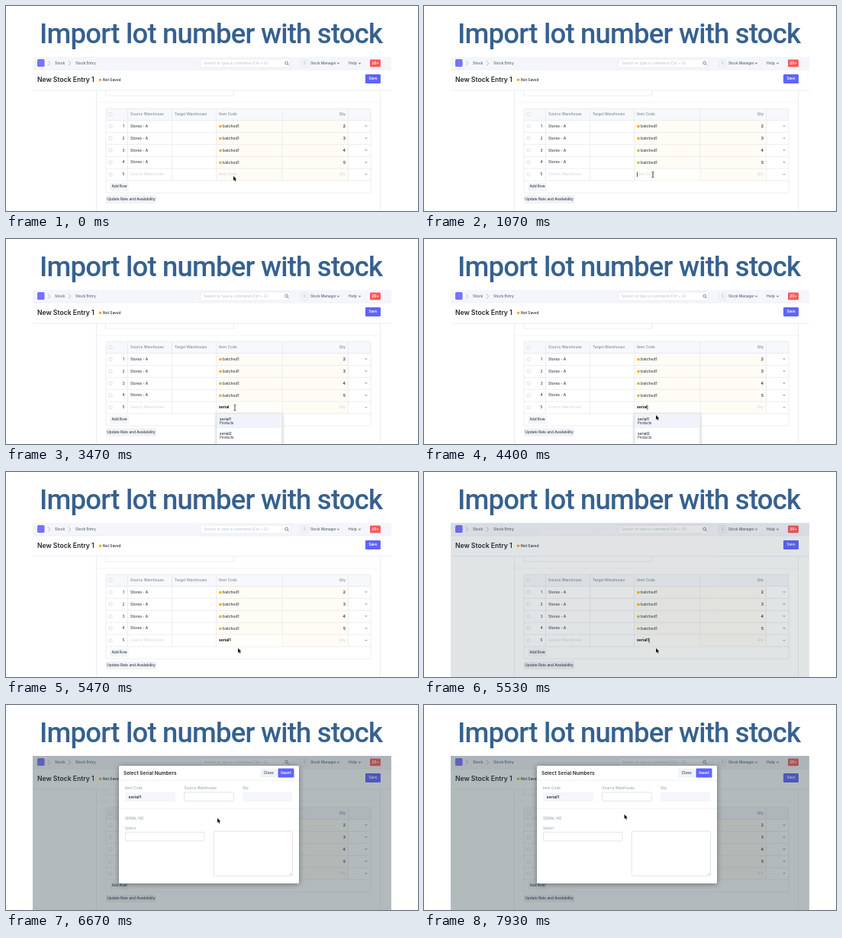
Animation, 540 px wide and 270 px high, one loop 8 s. Source, as an HTML page with a canvas:

```html
<!DOCTYPE html>
<html lang="en">
<head>
<meta charset="utf-8">
<title>Import lot number with stock</title>
<style>
html, body { margin: 0; width: 100%; height: 100%; overflow: hidden; background: #fff; }
canvas { display: block; width: 540px; height: 270px; }
</style>
</head>
<body>
<canvas id="stage"></canvas>
<script>
const LOOP = 8000;
const INK = '#36414c', MUTED = '#8d99a6', FAINT = '#d3d8dd', LINE = '#e2e6eb';
const PANEL = '#f5f6fb', BLUE = '#5e64ff', ORANGE = '#fba61c', OLIVE = '#bdbb55';

const canvas = document.getElementById('stage');
const ctx = canvas.getContext('2d');
const ratio = window.devicePixelRatio || 1;
canvas.width = 540 * ratio;
canvas.height = 270 * ratio;

// Typing: the field grows by one letter at each time, then the suggestion is picked.
const FOCUS = 930, PICK = 4500, OPEN = 5500;
const keyTimes = [1500, 1930, 2670, 2740, 2800, 2930];

// Pointer path: time, x, y
const path = [
  [0, 298, 224], [70, 298, 224], [270, 300, 222], [3470, 300, 222],
  [3950, 304, 232], [6070, 304, 232], [6600, 277, 149], [7900, 277, 149], [7930, 262.5, 144]
];

const clamp = v => Math.max(0, Math.min(1, v));

function rect(x, y, w, h, fill, stroke, radius = 0) {
  ctx.beginPath();
  ctx.roundRect(x, y, w, h, radius);
  if (fill) { ctx.fillStyle = fill; ctx.fill(); }
  if (stroke) { ctx.strokeStyle = stroke; ctx.lineWidth = 0.7; ctx.stroke(); }
}

function line(points, color = LINE, width = 0.7) {
  ctx.beginPath();
  points.forEach(([x, y]) => ctx.lineTo(x, y));
  ctx.strokeStyle = color;
  ctx.lineWidth = width;
  ctx.stroke();
}

function text(str, x, y, { size = 4.85, weight = 500, color = INK, align = 'left' } = {}) {
  ctx.font = `${weight} ${size}px Inter, sans-serif`;
  ctx.fillStyle = color;
  ctx.textAlign = align;
  ctx.textBaseline = 'middle';
  ctx.fillText(str, x, y);
}

function dot(x, y, color) {
  ctx.beginPath();
  ctx.arc(x, y, 1.8, 0, 7);
  ctx.fillStyle = color;
  ctx.fill();
}

function triangle(x, y, color) {
  ctx.beginPath();
  ctx.moveTo(x - 2, y - 1);
  ctx.lineTo(x + 2, y - 1);
  ctx.lineTo(x, y + 1.2);
  ctx.fillStyle = color;
  ctx.fill();
}

function button(label, x, y, w, h, fill, color, weight = 500) {
  rect(x, y, w, h, fill, null, 1.2);
  text(label, x + w / 2, y + h / 2, { color, weight, size: 4.75, align: 'center' });
}

function withShadow(blur, alpha, draw) {
  ctx.save();
  ctx.shadowColor = `rgba(0,0,0,${alpha})`;
  ctx.shadowBlur = blur * ratio;
  ctx.shadowOffsetY = ratio;
  draw();
  ctx.restore();
}

function drawTitle() {
  ctx.font = '500 36.5px Roboto, sans-serif';
  ctx.letterSpacing = '-0.8px';
  ctx.fillStyle = '#36618f';
  ctx.textAlign = 'center';
  ctx.textBaseline = 'alphabetic';
  ctx.fillText('Import lot number with stock', 268.7, 49);
  ctx.letterSpacing = '0px';
}

function drawHeader() {
  rect(35, 67, 470, 17, PANEL);
  line([[35, 84], [505, 84]], '#e8ebf1');
  rect(41, 70, 9.5, 10, '#7573fa', null, 1.5);
  for (const x of [55, 82]) line([[x, 72.3], [x + 2.6, 75.5], [x, 78.7]], '#a4afba', 0.8);
  text('Stock', 64, 75.7, { color: '#59636e' });
  text('Stock Entry', 91, 75.7, { color: '#59636e' });
  rect(255, 70, 118, 11, '#fff', LINE, 1.2);
  text('Search or type a command (Ctrl + G)', 259, 75.8, { color: '#b4bec8', weight: 400 });
  ctx.beginPath();
  ctx.arc(367.7, 75, 1.9, 0, 7);
  ctx.strokeStyle = '#68727c';
  ctx.lineWidth = 0.8;
  ctx.stroke();
  line([[369, 76.4], [371, 78.4]], '#68727c', 0.9);
  rect(386.5, 70.5, 9.5, 10, '#f1f3f7', '#e3e7ec', 1);
  text('S', 391.2, 75.7, { color: '#b4bcc5', align: 'center' });
  text('Stock Manager', 399, 75.7, { size: 4.7, color: '#59636e' });
  triangle(435.5, 75.8, '#8b949d');
  text('Help', 449, 75.7, { color: '#59636e' });
  triangle(463.5, 75.8, '#8b949d');
  button('20+', 477, 70.5, 14, 9.8, '#ff5858', '#fff', 700);

  text('New Stock Entry 1', 41, 97.3, { size: 8.6, weight: 600, color: '#20262c' });
  dot(123.5, 97.3, ORANGE);
  text('Not Saved', 127, 97.3, { size: 4.75, weight: 600 });
  button('Save', 471, 90, 20, 12, BLUE, '#fff', 600);
  line([[35, 111], [505, 111]]);
}

function fieldValue(t) {
  return t >= PICK ? 'serial1' : 'serial'.slice(0, keyTimes.filter(k => k <= t).length);
}

function drawTable(t) {
  line([[118.5, 111], [118.5, 270]]);
  line([[490.5, 111], [490.5, 270]]);
  line([[130.5, 111], [130.5, 118], [298.5, 118], [298.5, 111]]);
  line([[118.5, 127], [490.5, 127]], '#eceff2');

  rect(131, 135, 347, 15.5, '#f7f8fb');
  rect(275.5, 150.5, 173, 79.5, '#fffcf5');
  rect(131, 135, 347, 111, null, LINE, 1);
  for (let i = 0; i < 6; i++) line([[131, 150.5 + i * 15.9], [478, 150.5 + i * 15.9]]);
  for (const x of [159.5, 217.5, 275.5, 362, 448.5]) line([[x, 135], [x, 230]]);

  rect(135, 140.8, 4, 4, '#fff', '#cfd6dc', 0.6);
  const head = { color: '#7f8b97' };
  text('Source Warehouse', 163, 142.6, head);
  text('Target Warehouse', 221, 142.6, head);
  text('Item Code', 279, 142.6, head);
  text('Qty', 445, 142.6, { ...head, align: 'right' });

  for (let i = 0; i < 5; i++) {
    const y = 158.3 + i * 15.9;
    rect(135, y - 2, 4, 4, '#fff', '#cfd6dc', 0.6);
    text(i + 1, 154, y, { align: 'center' });
    triangle(472, y, '#b0b8c0');
    if (i === 4) break;
    text('Stores - A', 163, y);
    dot(281, y + 0.3, i < 2 ? ORANGE : OLIVE);
    text('batched1', 284, y, { size: 5 });
    text(i + 2, 445, y, { size: 5, weight: 700, align: 'right' });
  }

  const y = 221.9;
  text('Source Warehouse', 163, y, { color: FAINT });
  text('Qty', 445, y, { color: FAINT, align: 'right' });
  button('Add Row', 136, 232.5, 25, 11, '#f3f5f8', INK);
  button('Update Rate and Availability', 131, 249.5, 66, 10.5, '#f0f2f6', INK);

  const value = fieldValue(t);
  if (t >= FOCUS) rect(275.9, 214.5, 85.7, 15.2, '#fffefa');
  if (value) text(value, 279, y, { size: 5, weight: 700, color: '#111' });
  else text('Item Code', 279, y, { color: FAINT });

  const lastInput = [FOCUS, ...keyTimes, PICK].filter(k => k <= t).pop();
  if ((t - lastInput) % 1000 < 500) {
    const x = 279.5 + (value ? ctx.measureText(value).width : 0);
    line([[x, y - 3.2], [x, y + 3.2]], '#111', 0.7);
  }
}

function drawSuggestions() {
  withShadow(4, 0.2, () => rect(275.5, 230, 86.5, 50, '#fff', '#d5dbe1'));
  rect(276, 230.4, 85.5, 18.6, '#f0f3f9');
  ['serial1', 'serial2'].forEach((name, i) => {
    text(name, 280, 237.2 + i * 19, { weight: 600 });
    text('Products', 280, 242.6 + i * 19, { size: 4.3 });
  });
}

function drawDialog(t) {
  rect(35, 67, 470, 203, `rgba(51,70,75,${0.37 * clamp((t - OPEN) / 80)})`);
  const slide = clamp((t - 5600) / 300);
  ctx.save();
  ctx.globalAlpha = clamp((t - 5530) / 72);
  ctx.translate(0, -39.3 * (1 - slide) ** 2);
  withShadow(7, 0.4, () => rect(148, 80, 236, 155, '#fff', null, 1.5));

  text('Select Serial Numbers', 154, 90, { size: 6.5, weight: 600, color: '#20262c' });
  button('Close', 333.5, 83.5, 21.5, 12, '#f0f3f7', INK);
  button('Insert', 356.5, 83.5, 21, 12, BLUE, '#fff', 600);
  line([[148, 99], [384, 99]], '#e8ebef');

  const label = { size: 4.75, color: MUTED, weight: 400 };
  text('Item Code', 156, 109.7, label);
  text('Source Warehouse', 233.5, 109.7, label);
  text('Qty', 310, 109.7, label);
  rect(156, 115, 66, 12, PANEL, null, 1);
  rect(233.5, 115, 65, 11.5, '#fff', '#d3dae1', 1);
  rect(310, 115, 65.5, 12, PANEL, null, 1);
  text('serial1', 160.5, 121, { size: 5.3, weight: 700 });
  line([[148, 136.5], [384, 136.5]], '#edf0f3');

  text('SERIAL NO', 156, 150, { ...label, size: 4.7 });
  text('Select', 156, 162.2, label);
  rect(156.5, 167.5, 103.5, 11.5, '#fff', '#d3dae1', 1);
  rect(272.3, 166.2, 103.2, 58.8, '#fff', '#d3dae1', 1);
  line([[371.5, 224], [374.5, 221]], '#a0a8b0', 0.5);
  line([[373.2, 224], [374.5, 222.7]], '#a0a8b0', 0.5);
  ctx.restore();
}

function pointerAt(t) {
  const next = path.findIndex(p => p[0] > t);
  if (next < 0) return path[path.length - 1].slice(1);
  const [t0, x0, y0] = path[next - 1], [t1, x1, y1] = path[next];
  const u = (t - t0) / (t1 - t0), k = u * u * (3 - 2 * u);
  return [x0 + (x1 - x0) * k, y0 + (y1 - y0) * k];
}

function drawPointer(t) {
  if (t >= keyTimes[0] && t < 3470) return;
  const [x, y] = pointerAt(t);
  if (t >= 200 && t < 3800) {
    line([[x - 1.5, y - 3.6], [x, y - 3], [x + 1.5, y - 3.6]], '#222', 0.7);
    line([[x, y - 3], [x, y + 3.4]], '#222', 0.8);
    line([[x - 1.5, y + 4], [x, y + 3.4], [x + 1.5, y + 4]], '#222', 0.7);
    return;
  }
  const outline = [[0, 0], [0, 6], [1.4, 4.8], [2.4, 7], [3.4, 6.5], [2.5, 4.4], [4.3, 4.3]];
  ctx.beginPath();
  outline.forEach(([dx, dy]) => ctx.lineTo(x + dx, y + dy));
  ctx.closePath();
  ctx.strokeStyle = '#fff';
  ctx.lineWidth = 0.9;
  ctx.stroke();
  ctx.fillStyle = '#111';
  ctx.fill();
}

function draw(now) {
  const t = now % LOOP;
  ctx.setTransform(ratio, 0, 0, ratio, 0, 0);
  rect(0, 0, 540, 270, '#fff');
  drawTitle();
  ctx.save();
  ctx.beginPath();
  ctx.rect(35, 67, 470, 203);
  ctx.clip();
  drawTable(t);
  drawHeader();
  if (t >= 1600 && t < PICK) drawSuggestions();
  if (t >= OPEN) drawDialog(t);
  drawPointer(t);
  ctx.restore();
  requestAnimationFrame(draw);
}
requestAnimationFrame(draw);
</script>
</body>
</html>
```
